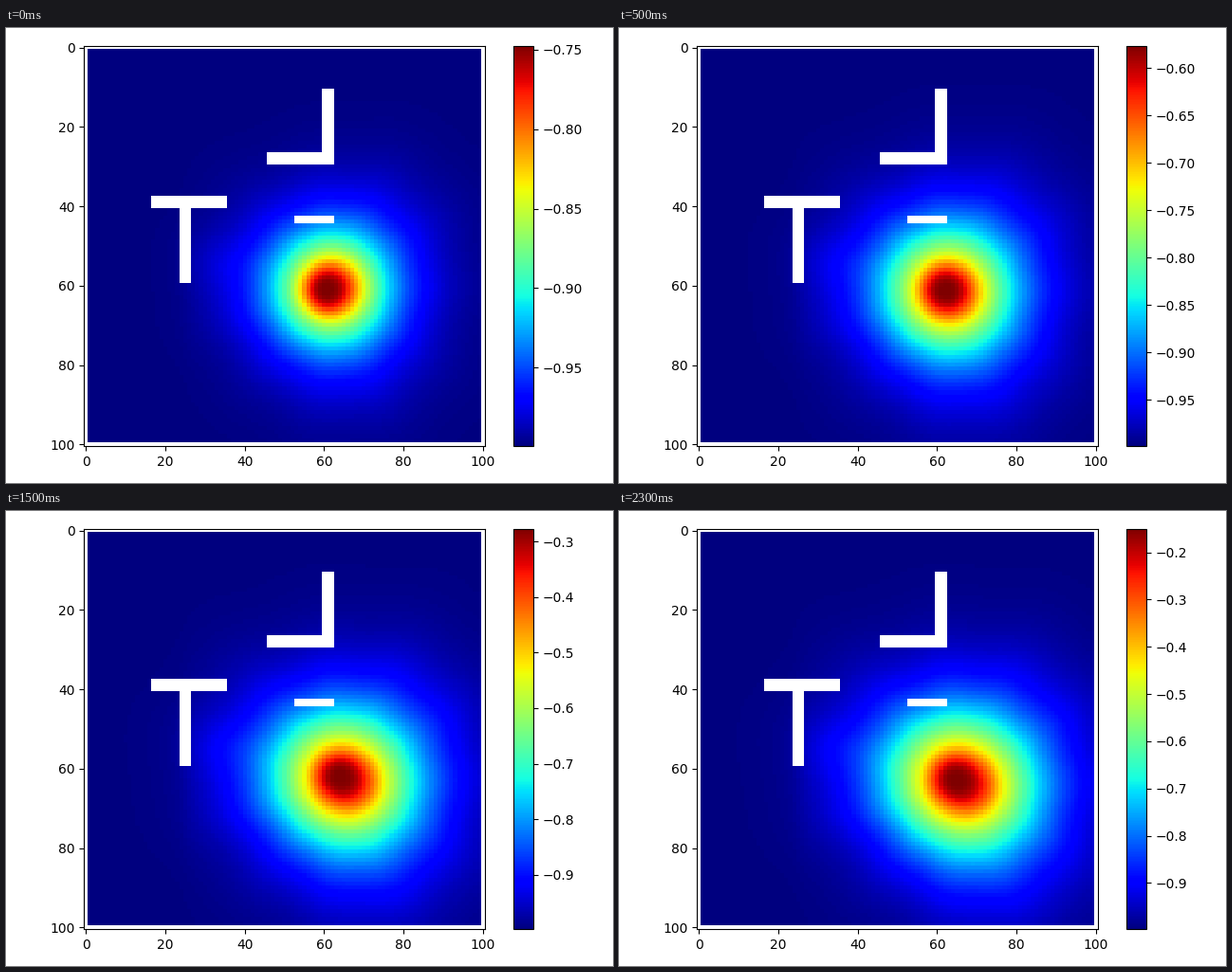
A matplotlib script for the animation above (2500 ms loop, 640 by 480 pixels).

```python
import matplotlib.pyplot as plt
import numpy as np
from matplotlib.animation import FuncAnimation

W, H, DPI = 640, 480, 100
N = 101
TOP, SIDE = 18.65, 422.75

# Highest value reached after each step
HIGHS = [-0.7475, -0.5766, -0.4037, -0.2771, -0.1500]

# Walls as x0, x1, y0, y1 in cells, end excluded
WALLS = [(60, 63, 11, 30), (46, 63, 27, 30), (17, 36, 38, 41),
         (24, 27, 38, 60), (53, 63, 43, 45)]

Y, X = np.mgrid[0:N, 0:N].astype(float)

blocked = np.ones((N, N), bool)
blocked[1:-1, 1:-1] = False
for x0, x1, y0, y1 in WALLS:
    blocked[y0:y1, x0:x1] = True


def bump(cx, cy, sx, sy):
    return np.exp(-((X - cx) / sx) ** 2 - ((Y - cy) / sy) ** 2)


def span(i):
    low = -0.9995 + 0.0013 * np.sqrt(i / (len(HIGHS) - 1))
    return low, HIGHS[i]


def field(i):
    """Hill that grows and drifts to the lower right with each step."""
    s = i / (len(HIGHS) - 1)
    px, py = 60.6 + 4.1 * s ** 0.75, 61.1 + 1.7 * s ** 2
    rx, ry = 61.8 + 4.4 * s, 60.8 + 2.8 * s

    # Inner rings centre on the peak, outer rings on (rx, ry)
    near = np.clip(np.hypot(X - px, Y - py) / 9, 0, 1)
    dx = X - px - (rx - px) * near
    dy = Y - py - (ry - py) * near
    dist, ang = np.hypot(dx, dy), np.arctan2(dy, dx)

    far = np.clip((dist - 10) / 25, 0, 1)
    wave = (0.045 * np.cos(3 * (ang - 1.25)) + 0.03 * np.cos(ang)
            + 0.015 * np.cos(11 * ang))
    size = 1 + 0.05 * s * np.cos(2 * (ang - 0.5)) + far * wave
    r = dist / size

    width = 13.6 + 4.2 * s ** 0.6
    power = 1.35 + 0.1 * s
    round_top = 1 - np.exp(-(r / 5) ** 2)
    level = np.exp(-(r / width) ** power * round_top)
    # Open gap beside the T, darker on its far side
    level *= 1 - 0.4 / (1 + np.exp(X - 24.5))
    level += 0.02 * bump(32, 55, 7, 8)

    low, high = span(i)
    values = low + np.clip(level, 0, 1) * (high - low)
    return np.where(blocked, np.nan, values)


def add_axes(left, width):
    return fig.add_axes([left / W, 1 - (TOP + SIDE) / H, width / W, SIDE / H])


fig = plt.figure(figsize=(W / DPI, H / DPI), dpi=DPI)
ax = add_axes(82.2, SIDE)
cax = add_axes(534.9, SIDE / 20)
im = ax.imshow(field(0), cmap="jet", aspect="auto", interpolation="nearest")
im.set_clim(*span(0))
fig.colorbar(im, cax=cax)


def draw(i):
    im.set_data(field(i))
    im.set_clim(*span(i))
    return [im]


anim = FuncAnimation(fig, draw, frames=len(HIGHS), interval=500,
                     repeat=True, repeat_delay=0, blit=False)
plt.show()
```
